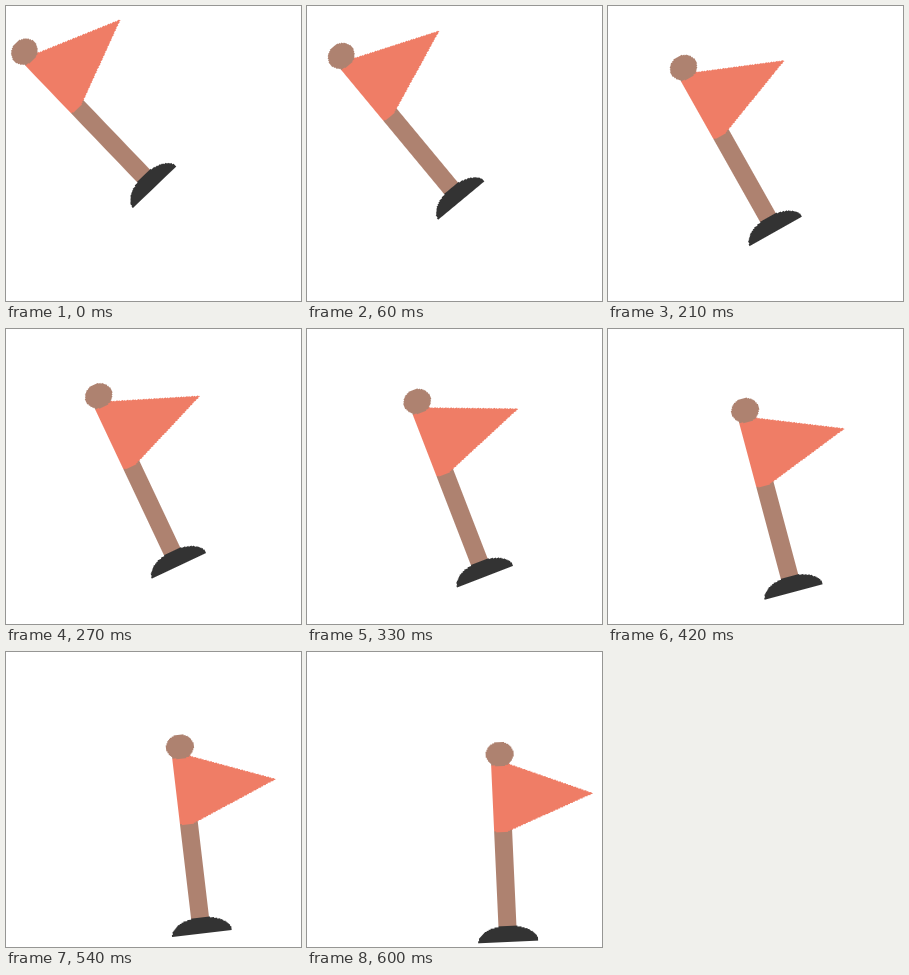
Recreate the animation shown at these times as an HTML page. Size 295 by 295 pixels, loop 0.63 s.

```html
<!DOCTYPE html>
<html lang="en">
<head>
<meta charset="utf-8">
<title>Swinging flag</title>
<style>
  html, body { margin: 0; width: 100%; height: 100%; overflow: hidden; background: #fff; }
  svg { display: block; width: 100%; height: 100%; shape-rendering: crispEdges; }
  .wood { fill: #ae8270; }
  .cloth { fill: #ef7d66; }
  .foot { fill: #333; }
  .flag { transform-origin: 0 0; animation: swing 630ms steps(21, end) infinite; }
  @keyframes swing {
    from { transform: translate(102.4px, 87px) rotate(-43.8deg); }
    to { transform: translate(234.9px, 193.7px) rotate(-0.54deg); }
  }
</style>
</head>
<body>
<svg viewBox="0 0 295 295">
  <g class="flag">
    <!-- the knob sits at 0,0; the flag turns about its middle -->
    <g transform="translate(-32 -88)">
      <rect class="wood" x="-8.6" y="0" width="17.4" height="180"/>
      <path class="cloth" d="M-8.7 10.5 Q0 14 8.8 10.2 L91.6 43.3 L8.8 76 Q0 80.5 -8.7 77 Z"/>
      <ellipse class="wood" rx="14" ry="12.2"/>
      <path class="foot" d="M-29.9 188.2 A30.2 16.6 0 0 1 30.5 188.2 Z"/>
    </g>
  </g>
</svg>
</body>
</html>
```
